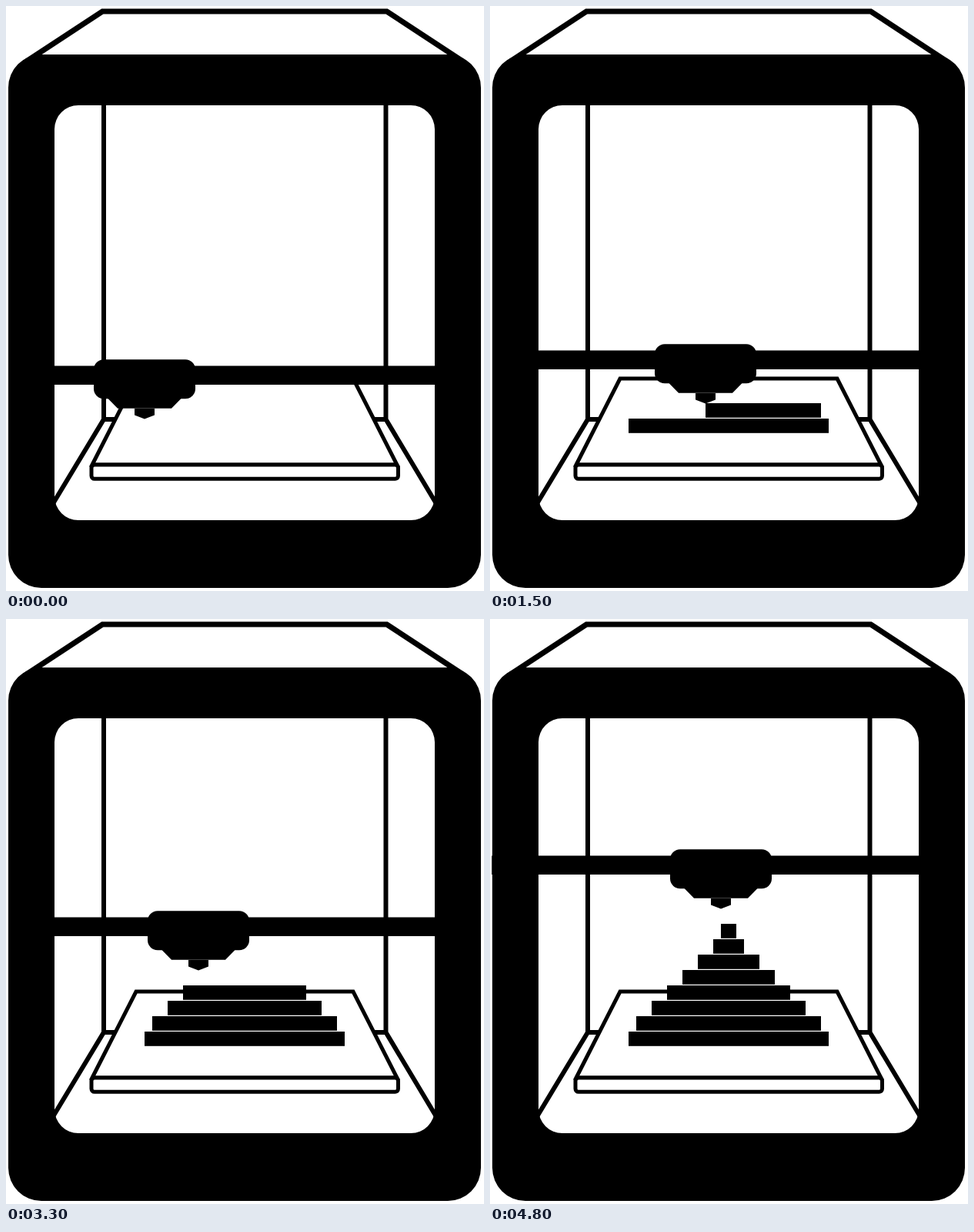
Animation of 621x760 px, one loop 4.95 s. Source, as an HTML page:

```html
<!DOCTYPE html>
<html lang="en">
<head>
<meta charset="utf-8">
<title>Layer printer</title>
<style>
  html, body { margin: 0; width: 100%; height: 100%; overflow: hidden; background: #fff; }
  svg { display: block; width: 621px; height: 760px; }
  .line { fill: none; stroke: #000; }
  .bed { fill: #fff; stroke: #000; stroke-width: 5; stroke-linejoin: round; }
</style>
</head>
<body>
<svg viewBox="0 0 621 760">
  <!-- back of the case -->
  <path class="line" stroke-width="7.2" d="M26 72.2L125.3 7H494.7L594 72.2"/>
  <path class="line" stroke-width="6" d="M127 125V537M493.5 125V537M58 651.5L127 537H493.5L562 651.5"/>

  <!-- print bed -->
  <path class="bed" style="stroke-linejoin:miter" d="M112 596L169 484H451L508 596Z"/>
  <rect class="bed" x="111" y="596" width="398.5" height="18.3" rx="4"/>

  <!-- front frame -->
  <path fill-rule="evenodd" d="M46 63H574a43 43 0 0 1 43 43V713a43 43 0 0 1-43 43H46a43 43 0 0 1-43-43V106a43 43 0 0 1 43-43Z
    M94 129a31 31 0 0 0-31 31V637a31 31 0 0 0 31 31H526a31 31 0 0 0 31-31V160a31 31 0 0 0-31-31Z"/>

  <g id="layers"></g>

  <g id="gantry">
    <rect id="rail" y="467.5" height="24.5"/>
    <g id="head">
      <rect x="-66" y="459.3" width="132" height="51" rx="13"/>
      <path d="M-48 509.5L-35 522.7H35L48 509.5Z"/>
      <path d="M-13 523H13V531.5L0 536.4L-13 531.5Z"/>
    </g>
  </g>
</svg>
<script>
  const STEP = 150, STRIDE = 50, RISE = 20, MIRROR = 620;
  // Left edge of each layer and the number of steps spent on it; the last entry is the parked head.
  const lefts = [180, 190, 210, 230, 250, 270, 290, 300, 300];
  const counts = [7, 6, 5, 4, 3, 3, 2, 2, 1];
  const total = counts.reduce((a, b) => a + b);
  const parked = counts.length - 1;

  const $ = id => document.getElementById(id);
  const set = (el, attrs) => {
    for (const key in attrs) el.setAttribute(key, attrs[key]);
  };

  const bars = lefts.slice(0, parked).map((_, i) => {
    const bar = document.createElementNS($('layers').namespaceURI, 'rect');
    set(bar, { y: 536 - RISE * i, height: 18.8 });
    return $('layers').appendChild(bar);
  });

  // Even layers run left to right, odd ones back; the last step snaps to the end.
  function headX(level, i) {
    const dir = level % 2 ? -1 : 1;
    const left = lefts[level], right = MIRROR - left;
    const [start, end] = dir > 0 ? [left, right] : [right, left];
    if (i === 0) return start;
    return i === counts[level] - 1 ? end : start + dir * STRIDE * i;
  }

  function draw(step) {
    let level = 0, i = step;
    while (i >= counts[level]) i -= counts[level++];
    const x = headX(level, i);

    bars.forEach((bar, n) => {
      let from = lefts[n], to = MIRROR - from;
      if (n > level) to = from;
      else if (n === level) n % 2 ? from = x : to = x;
      set(bar, { x: from, width: to - from });
    });

    const railX = level === parked ? 2.3 : 62;
    set($('rail'), { x: railX, width: 558 - railX });
    set($('gantry'), { transform: `translate(0 ${-RISE * level})` });
    set($('head'), { transform: `translate(${x} 0)` });
  }

  function tick(now) {
    draw(Math.floor(now / STEP) % total);
    requestAnimationFrame(tick);
  }
  draw(0);
  requestAnimationFrame(tick);
</script>
</body>
</html>
```
